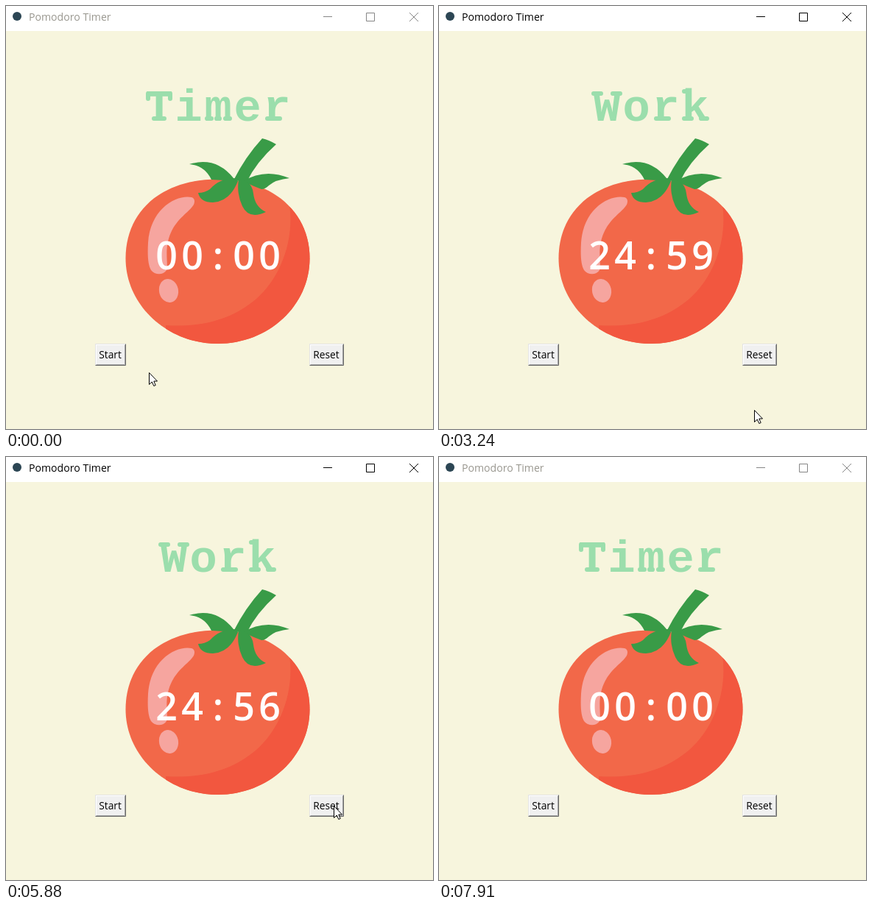
Animation, 580 px wide and 575 px high, one loop 8.1 s. Source, as an HTML page:

```html
<!DOCTYPE html>
<html lang="en">
<head>
<meta charset="utf-8">
<title>Pomodoro Timer</title>
<style>
  html, body { margin: 0; width: 100%; height: 100%; overflow: hidden; background: #f7f5dd; }
  svg { display: block; width: 580px; height: 575px; }
  .ui { font-family: "Open Sans", "Noto Sans", sans-serif; }
  .heading { font: bold 62px "Liberation Mono", monospace; fill: #9bdeac; text-anchor: middle; }
  .digits { font: 600 52px "Open Sans", sans-serif; fill: #fff; text-anchor: middle; }
  .slabs { stroke: #9bdeac; stroke-width: 6; stroke-linecap: round; fill: none; }
  #chrome { fill: #000; stroke: #000; }
  #chrome.idle { fill: #99978f; stroke: #858585; }
</style>
</head>
<body>
<svg viewBox="0 0 580 575" xmlns="http://www.w3.org/2000/svg">
  <defs>
    <path id="body" d="M162.500 343C162.500 280 210 235.500 287.500 235.500C362 235.500 412.500 280 412.500 343C412.500 407 357 459 287.500 459C219 459 162.500 407 162.500 343Z"/>
    <clipPath id="bodyClip"><use href="#body"/></clipPath>
  </defs>

  <rect width="580" height="575" fill="#f7f5dd"/>
  <rect width="580" height="34" fill="#fff"/>
  <circle cx="15" cy="14" r="6" fill="#2c4654"/>
  <g id="chrome">
    <text class="ui" x="31" y="20" font-size="14.1" stroke="none">Pomodoro Timer</text>
    <path d="M431 14.5H443M489.5 9.5H500.5V20.5H489.5ZM548 9L560 21M560 9L548 21" fill="none"/>
  </g>

  <text id="heading" class="heading" y="156"></text>
  <g id="slabs" class="slabs"></g>

  <use href="#body" fill="#f26849"/>
  <path clip-path="url(#bodyClip)" fill="#f2573f"
    d="M385 270C392 320 372 370 340 398C305 428 262 437 217 434V470H430V270Z"/>
  <g fill="#f6a59f">
    <path d="M252 260C232 256 196 275 193 322C192 340 193 352 197 359C202 366 214 366 218 359C221 350 214 330 224 308C233 288 248 281 255 270C257 265 256 261 252 260Z"/>
    <ellipse cx="221" cy="387" rx="13" ry="16" transform="rotate(-12 221 387)"/>
  </g>
  <g fill="#399b47">
    <path d="M348 180Q357 182 367 188Q340 212 327 239L309 237Q325 205 348 180Z"/>
    <path d="M249 215Q285 204 309 234L313 238L279 236Q270 217 249 215Z"/>
    <path d="M312 234Q290 234 277 249Q270 254 261 254Q264 267 281 267Q304 266 315 238Z"/>
    <path d="M316 236Q313 255 321 272Q330 291 353 280Q338 273 336 255Q335 244 326 237Z"/>
    <path d="M322 238Q352 220 385 234Q366 236 357 244Q352 249 347 249Q336 245 326 240Z"/>
  </g>

  <text id="clock" class="digits" y="358"></text>
  <g id="buttons"></g>

  <path id="cursor" fill="#fff" stroke="#000"
    d="M.5 .5V16.500L4.300 13L6.800 18.500L9.200 17.500L6.800 12H11.500Z"/>
</svg>

<script>
// The picture advances in equal steps; all times below count steps.
const LOOP = 8100, STEPS = 40, LEAD = 15;
const CLICK = 6, STARTED = 7, RESET = 30, IDLE = 39, TICK = 5;
const CENTER = 288;

// Pointer gestures: start, duration, end point
const ORIGIN = [194, 498];
const GESTURES = [
  [0, 2, 138, 472],
  [7, 2.5, 345, 539],
  [15, 2.2, 537, 562],
  [19, 0, 2, 204],
  [20, 3, 528, 230],
  [23, 3, 307, 418],
  [26, 3, 445, 474],
  [33, 3, 411, 553]
];
const isAway = n => n === 19 || n >= 37;

// Slab serifs, relative to the middle of a letter's cell
const SERIFS = {
  T: "M-15 119V126M15 119V126M-7 153H7",
  W: "M-18 119H-8M8 119H18",
  m: "M-15 153H-9M-2 153H2M10 153H16",
  r: "M-13 153H4",
  k: "M-15 116H-10M-15 153H-5M8 153H16"
};

const $ = id => document.getElementById(id);

const cellX = (i, count, pitch) => CENTER + (i - (count - 1) / 2) * pitch;

// Sets each character in the middle of its own fixed-pitch cell.
function setMono(el, text, pitch) {
  el.innerHTML = [...text].map((c, i) =>
    `<tspan x="${cellX(i, text.length, pitch)}">${c}</tspan>`).join("");
}

function setHeading(word) {
  setMono($("heading"), word, 40);
  $("slabs").innerHTML = [...word].map((c, i) =>
    `<path transform="translate(${cellX(i, word.length, 40)})" d="${SERIFS[c] || ""}"/>`).join("");
}

function button(x, w, label) {
  const y = 459, h = 30;
  const edge = (inset, light, dark) => {
    const l = x + inset, t = y + inset, r = x + w - inset, b = y + h - inset;
    return `<path d="M${l} ${b}V${t}H${r}" stroke="${light}"/>
      <path d="M${l} ${b}H${r}V${t}" stroke="${dark}"/>`;
  };
  return `<rect x="${x}" y="${y}" width="${w}" height="${h}" fill="#f0f0f0"/>
    <g fill="none">${edge(1.5, "#fff", "#a0a0a0")}${edge(.5, "#e3e3e3", "#696969")}</g>
    <text class="ui" x="${x + w / 2 - .5}" y="479" font-size="13.8" text-anchor="middle">${label}</text>`;
}

const pad = n => String(n).padStart(2, "0");

function clockText(n) {
  const left = 25 * 60 - Math.floor((n - STARTED) / TICK);
  return pad(Math.floor(left / 60)) + ":" + pad(left % 60);
}

const smooth = u => u * u * (3 - 2 * u);

function pointerAt(n) {
  let [x, y] = ORIGIN;
  for (const [start, span, toX, toY] of GESTURES) {
    if (n < start) break;
    const k = span ? smooth(Math.min(1, (n - start) / span)) : 1;
    x += (toX - x) * k;
    y += (toY - y) * k;
  }
  return [Math.round(x), Math.round(y)];
}

function draw(n) {
  const running = n >= STARTED && n < RESET;
  setHeading(running ? "Work" : "Timer");
  setMono($("clock"), running ? clockText(n) : "00:00", 35);
  $("chrome").classList.toggle("idle", n < CLICK || n >= IDLE);
  $("cursor").style.display = isAway(n) ? "none" : "";
  $("cursor").setAttribute("transform", `translate(${pointerAt(n)})`);
}

$("buttons").innerHTML = button(121, 42, "Start") + button(412, 47, "Reset");

const start = performance.now();
let shown = -1;
function frame() {
  const t = (performance.now() - start) % LOOP;
  const n = Math.floor((t + LEAD) / LOOP * STEPS) % STEPS;
  if (n !== shown) draw(shown = n);
  requestAnimationFrame(frame);
}
frame();
</script>
</body>
</html>
```
